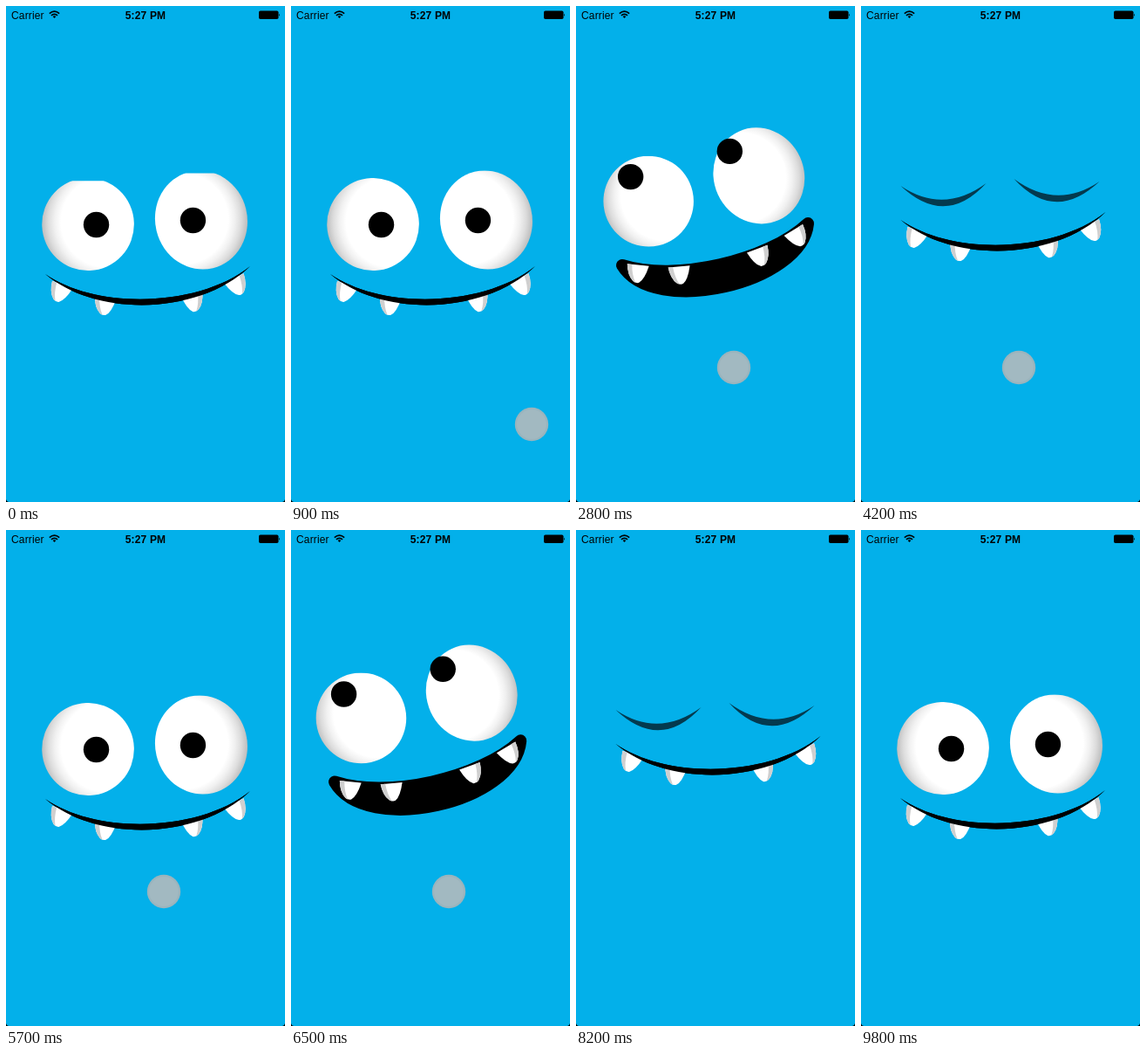
These frames come from a looping animation (320 px wide and 568 px high, 9.9 s). An HTML page with a canvas:

```html
<!DOCTYPE html>
<html lang="en">
<head>
<meta charset="utf-8">
<style>
  html, body { margin: 0; width: 100%; height: 100%; overflow: hidden; background: #03b0ea; }
  canvas, svg { position: absolute; left: 0; top: 0; width: 320px; height: 568px; }
  text { font: 12px "Liberation Sans", Arial, sans-serif; letter-spacing: .15px; }
  .clock { font-weight: bold; }
</style>
</head>
<body>
<canvas id="stage"></canvas>
<svg viewBox="0 0 320 568">
  <text x="6" y="14.5">Carrier</text>
  <text x="160" y="14.5" text-anchor="middle" class="clock">5:27 PM</text>
  <g fill="none" stroke="#000" stroke-width="1.6">
    <path d="M49.8 8.6Q55.5 3.8 61.2 8.6M51.9 10.9Q55.5 7.8 59.1 10.9"/>
    <path d="M53.6 12.1L55.5 14L57.4 12.1Q55.5 10.6 53.6 12.1Z" fill="#000" stroke="none"/>
  </g>
  <rect x="290" y="5.5" width="22.5" height="9.5" rx="1.8"/>
  <path d="M313.2 8.5q1.8 1.7 0 3.5z"/>
  <path d="M0 565v3h3q-2.5-.5-3-3zM320 565v3h-3q2.5-.5 3-3z"/>
</svg>
<script>
const LOOP = 9900, W = 320, H = 568;
const EYE_GAP = 65, LIP = 14;
const canvas = document.getElementById('stage');
const ctx = canvas.getContext('2d');
const dpr = window.devicePixelRatio || 1;
canvas.width = W * dpr;
canvas.height = H * dpr;

// x, y: point between the eyes; gx, gy: gaze; cross: pupils turned inwards
// left, right: mouth corners; sag: curve depth; gape: opening; lip: 0 closed to 1 open
const rest = {
  x: 159, y: 247.5, tilt: -2.2, size: 1, gx: 0, gy: 0.5, cross: 9.5, lid: 0,
  left: [45, 307], right: [280, 298], sag: 44, gape: 9, lip: 0, bite: 1
};
const laugh = {
  ...rest, x: 146.5, y: 209, tilt: -13, size: 0.98, gx: -27, gy: -28, cross: 6.5,
  left: [53, 297], right: [266, 249], sag: 32, gape: 34, lip: 1
};
const lean = {
  ...laugh, x: 135, y: 238, tilt: -15,
  left: [27, 322], right: [277, 258], sag: 43, gape: 9, lip: 0, bite: 0.65
};

const shift = (p, dx, dy, extra) => ({
  ...p, x: p.x + dx, y: p.y + dy,
  left: [p.left[0] + dx, p.left[1] + dy],
  right: [p.right[0] + dx, p.right[1] + dy],
  ...extra
});

const sunk = shift(rest, 0, 1);
const shout = { ...rest, left: [50, 311], right: [274, 303], sag: 38, gape: 137, lip: 1 };
const leap = shift(laugh, -3, -9);
const asleep = shift(rest, 0.5, -62, { lid: 1 });
const shut = { ...rest, lid: 1 };

const cycle = [
  [0, rest], [100, sunk], [430, shout], [950, leap], [1300, laugh], [1600, lean],
  [1850, lean], [2500, asleep], [3350, asleep], [3650, shut], [4050, rest]
];
const blink = [
  [0, { ...rest, lid: 0.03 }], [260, shift(rest, 0, 4, { lid: 1, size: 1.05 })], [600, rest]
];

const clamp = v => Math.max(0, Math.min(1, v));
const ease = v => (1 - Math.cos(Math.PI * clamp(v))) / 2;

function mix(a, b, k) {
  if (typeof a === 'number') return a + (b - a) * k;
  if (Array.isArray(a)) return a.map((v, i) => mix(v, b[i], k));
  return Object.fromEntries(Object.keys(a).map(n => [n, mix(a[n], b[n], k)]));
}

function poseAt(keys, t) {
  const i = keys.findIndex(([at]) => at > t);
  if (i < 0) return keys[keys.length - 1][1];
  const [t0, a] = keys[i - 1], [t1, b] = keys[i];
  return mix(a, b, ease((t - t0) / (t1 - t0)));
}

function facePose(t) {
  if (t < 1500) return poseAt(blink, t);
  return poseAt(cycle, t < 5600 ? t - 1500 : t - 5600);
}

function disc(x, y, r, fill) {
  ctx.beginPath();
  ctx.arc(x, y, r, 0, 7);
  ctx.fillStyle = fill;
  ctx.fill();
}

const lash = new Path2D('M-49 18Q2 66 49 15Q0 51 -49 18Z');

// side: -1 left, 1 right
function drawEye({ x, y, tilt, size, gx, gy, cross, lid }, side) {
  const turn = tilt * Math.PI / 180;
  const rx = 52.8 * size, ry = (side > 0 ? 56.8 : 53) * size;
  ctx.save();
  ctx.translate(x + side * EYE_GAP * Math.cos(turn), y + side * EYE_GAP * Math.sin(turn));
  if (lid < 1) {
    ctx.save();
    ctx.beginPath();
    ctx.rect(-70, -ry + 2 * ry * lid, 140, 140);
    ctx.clip();
    ctx.save();
    ctx.rotate(turn);
    const shade = ctx.createRadialGradient(-side * 21, -2, 0, -side * 21, -2, 74);
    ['#fff', '#fff', '#fff', '#f1f1f1', '#dcdcdc', '#bebebe']
      .forEach((c, i) => shade.addColorStop(i ? 0.5 + i * 0.1 : 0, c));
    ctx.beginPath();
    ctx.ellipse(0, 0, rx, ry, side > 0 ? -0.2 : 0, 0, 7);
    ctx.fillStyle = shade;
    ctx.fill();
    ctx.restore();
    disc(gx - side * cross, gy, 14.7, '#000');
    ctx.restore();
  }
  ctx.globalAlpha = clamp((lid - 0.75) * 4);
  ctx.fillStyle = '#043a4f';
  ctx.scale(-side, 1);
  ctx.fill(lash);
  ctx.restore();
}

const tooth = new Path2D('M-12.5 0H12.5Q9 16 3 20Q0 21.5 -4 19Q-11 13 -12.5 0Z');
const toothShade = new Path2D('M-12.5 0H-7Q-6 12 -1 20.5Q-3 20 -4 19Q-11 13 -12.5 0Z');

// seat a tooth on the upper lip, t along the curve
function drawTooth(t, side, len, { sag, lip, bite }) {
  const r = 1 - t;
  const x = len * (0.75 * r * r * t + 2.25 * r * t * t + t ** 3);
  const dx = len * (0.75 * r * r + 3 * r * t + 0.75 * t * t);
  ctx.save();
  ctx.translate(x, 3 * t * r * sag + 1 - 6 * lip);
  ctx.rotate(0.85 * Math.atan2(3 * (r - t) * sag, dx));
  ctx.scale(-side, bite);
  ctx.fillStyle = '#fff';
  ctx.fill(tooth);
  ctx.fillStyle = '#cfcfcf';
  ctx.fill(toothShade);
  ctx.restore();
}

function lipShape(len, sag, depth, spread) {
  ctx.beginPath();
  ctx.moveTo(0, 0);
  ctx.bezierCurveTo(len / 4, sag, len * 3 / 4, sag, len, 0);
  ctx.bezierCurveTo(len * (1 - spread), depth, len * spread, depth, 0, 0);
  ctx.closePath();
  ctx.fillStyle = '#000';
  ctx.fill();
}

function drawMouth(pose) {
  const { left, right, sag, gape, lip } = pose;
  const dx = right[0] - left[0], dy = right[1] - left[1];
  const len = Math.hypot(dx, dy);
  ctx.save();
  ctx.translate(...left);
  ctx.rotate(Math.atan2(dy, dx));
  lipShape(len, sag, sag + gape, 0.25 - 0.15 * lip);
  if (lip > 0.01) {
    ctx.lineWidth = LIP * lip;
    ctx.lineJoin = 'round';
    ctx.stroke();
  }
  for (const t of [0.1, 0.31]) {
    drawTooth(t, -1, len, pose);
    drawTooth(1 - t, 1, len, pose);
  }
  // closed lip covers the tooth roots
  lipShape(len, sag, sag + 9 * (1 - lip), 0.25);
  ctx.restore();
}

function drawTouch(t) {
  if (t < 900 || t >= 8000) return;
  const k = ease((t - 900) / 400);
  const x = 276 - 95 * k, y = 479 - 65 * k;
  disc(x, y, 19.2, '#9ab4bd');
  disc(x, y, 17, '#a2b9c1');
}

function draw(t) {
  const pose = facePose(t);
  ctx.setTransform(dpr, 0, 0, dpr, 0, 0);
  ctx.fillStyle = '#03b0ea';
  ctx.fillRect(0, 0, W, H);
  drawEye(pose, -1);
  drawEye(pose, 1);
  drawMouth(pose);
  drawTouch(t);
}

const start = performance.now();
function tick() {
  draw((performance.now() - start) % LOOP);
  requestAnimationFrame(tick);
}
tick();
</script>
</body>
</html>
```
